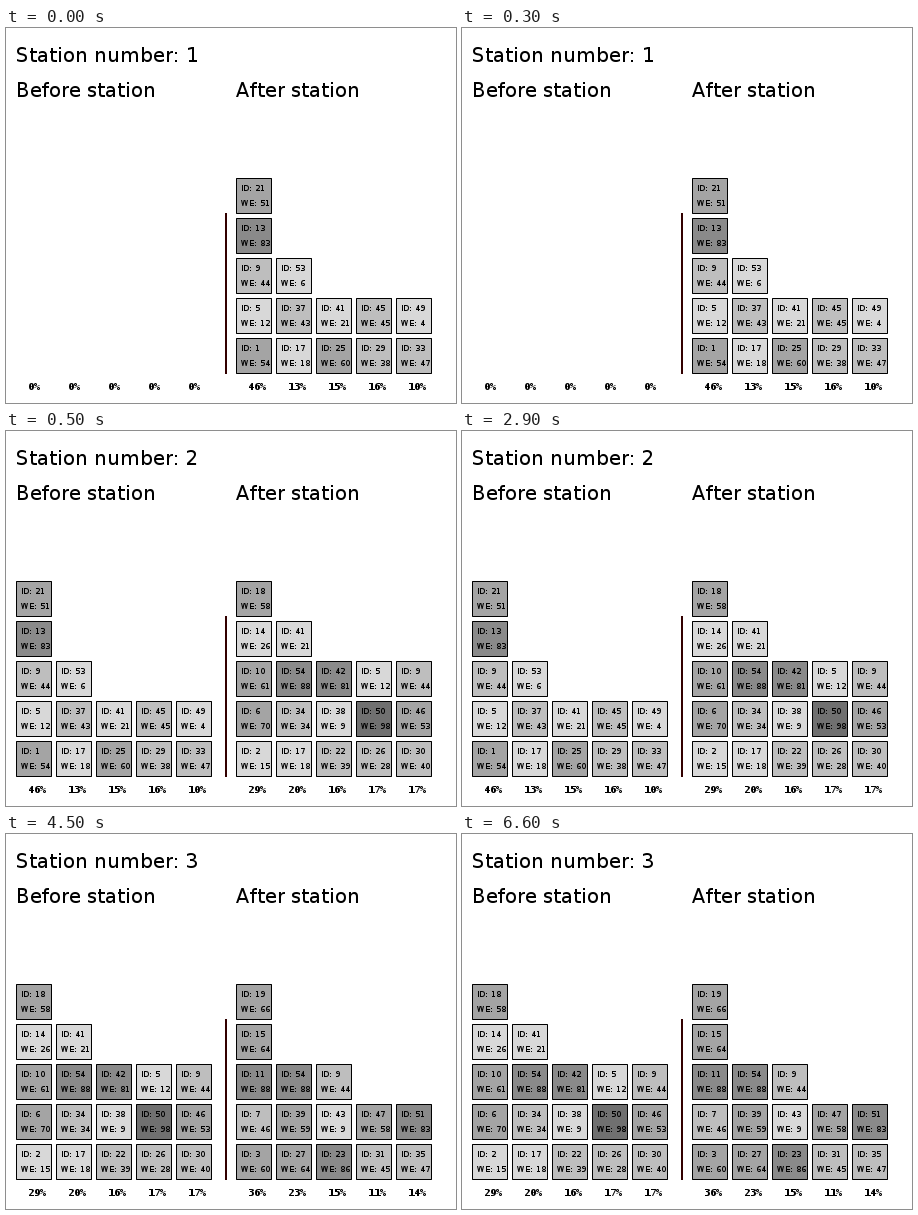
Recreate the animation shown at these times as a matplotlib script. Size 450x375 px, loop 8000 ms.

```python
import matplotlib.pyplot as plt
from matplotlib.animation import FuncAnimation
from matplotlib.patches import Rectangle

W, H, DPI = 450, 375, 100
PX = 72 / DPI  # points per pixel
STEP, LOOP = 500, 8000
PITCH, SIDE, FLOOR = 40, 35, 310
COLUMNS, FIRST_STACK = 5, 5

plt.rcParams.update({
    "text.hinting": "default",
    "text.hinting_factor": 1,
    "text.kerning_factor": 6,  # switches kerning off
    "toolbar": "None",
})

# Box ids rise in steps of four; each row holds the weights of one such series.
WEIGHTS = [
    [54, 12, 44, 83, 18, 51, 60, 38, 47, 43, 21, 45, 4, 6],
    [15, 70, 61, 26, 58, 39, 28, 40, 34, 9, 81, 53, 98, 88],
    [60, 46, 88, 64, 66, 86, 64, 45, 47, 59, 9, 58, 83],
]

# Order in which boxes are loaded: none at first, then after each station.
LOADS = [
    [],
    [*range(1, 14, 4), 21, 17, *range(25, 54, 4)],
    [*range(2, 19, 4), 17, *range(22, 39, 4), 50, 46, 54, 42, 5, 9, 41],
    [*range(3, 20, 4), 27, 23, *range(31, 52, 4), 54, 9],
]

fig = plt.figure(figsize=(W / DPI, H / DPI), dpi=DPI, facecolor="white")
ax = fig.add_axes([0, 0, 1, 1])


def weight_of(ident):
    step, series = divmod(ident - 1, 4)
    return WEIGHTS[series][step]


def stack_up(ids):
    """Fill the first column, then deal the rest round the others."""
    rest = ids[FIRST_STACK:]
    others = COLUMNS - 1
    return [ids[:FIRST_STACK]] + [rest[i::others] for i in range(others)]


def grey(weight):
    level = (weight - 4) // 23
    return str((216 - 26 * level) / 255)


def label(x, baseline, text, size, family="DejaVu Sans", weight="normal"):
    ax.text(x, baseline, text, fontsize=size * PX, family=family,
            weight=weight, color="black", ha="left", va="baseline")


def draw_box(x, y, ident):
    weight = weight_of(ident)
    ax.add_patch(Rectangle((x + 0.5, y + 0.5), SIDE, SIDE, lw=PX,
                           fc=grey(weight), ec="black", snap=False))
    label(x + 5, y + 13, f"ID: {ident}", 8)
    label(x + 5, y + 28, f"WE: {weight}", 8)


def draw_load(left, ids):
    total = sum(map(weight_of, ids)) or 1
    for col, stack in enumerate(stack_up(ids)):
        x = left + col * PITCH
        for row, ident in enumerate(stack):
            draw_box(x, FLOOR - row * PITCH, ident)
        share = 100 * sum(map(weight_of, stack)) / total
        label(x + 12, 362, f"{share:.0f}%", 10, "DejaVu Sans Mono", "bold")


def station_at(ms):
    return 1 + (ms >= 500) + (ms >= 4500)


def draw(frame):
    ax.clear()
    ax.set(xlim=(0, W), ylim=(H, 0))
    ax.axis("off")
    station = station_at(frame * STEP)
    label(10, 34, f"Station number: {station}", 20)
    label(10, 69, "Before station", 20)
    label(230, 69, "After station", 20)
    ax.add_patch(Rectangle((219, 185), 2, 161, fc="#320000", lw=0, snap=False))
    draw_load(10, LOADS[station - 1])
    draw_load(230, LOADS[station])
    return []


anim = FuncAnimation(fig, draw, frames=LOOP // STEP, interval=STEP,
                     init_func=lambda: draw(0), repeat=True, repeat_delay=0)
plt.show()
```
